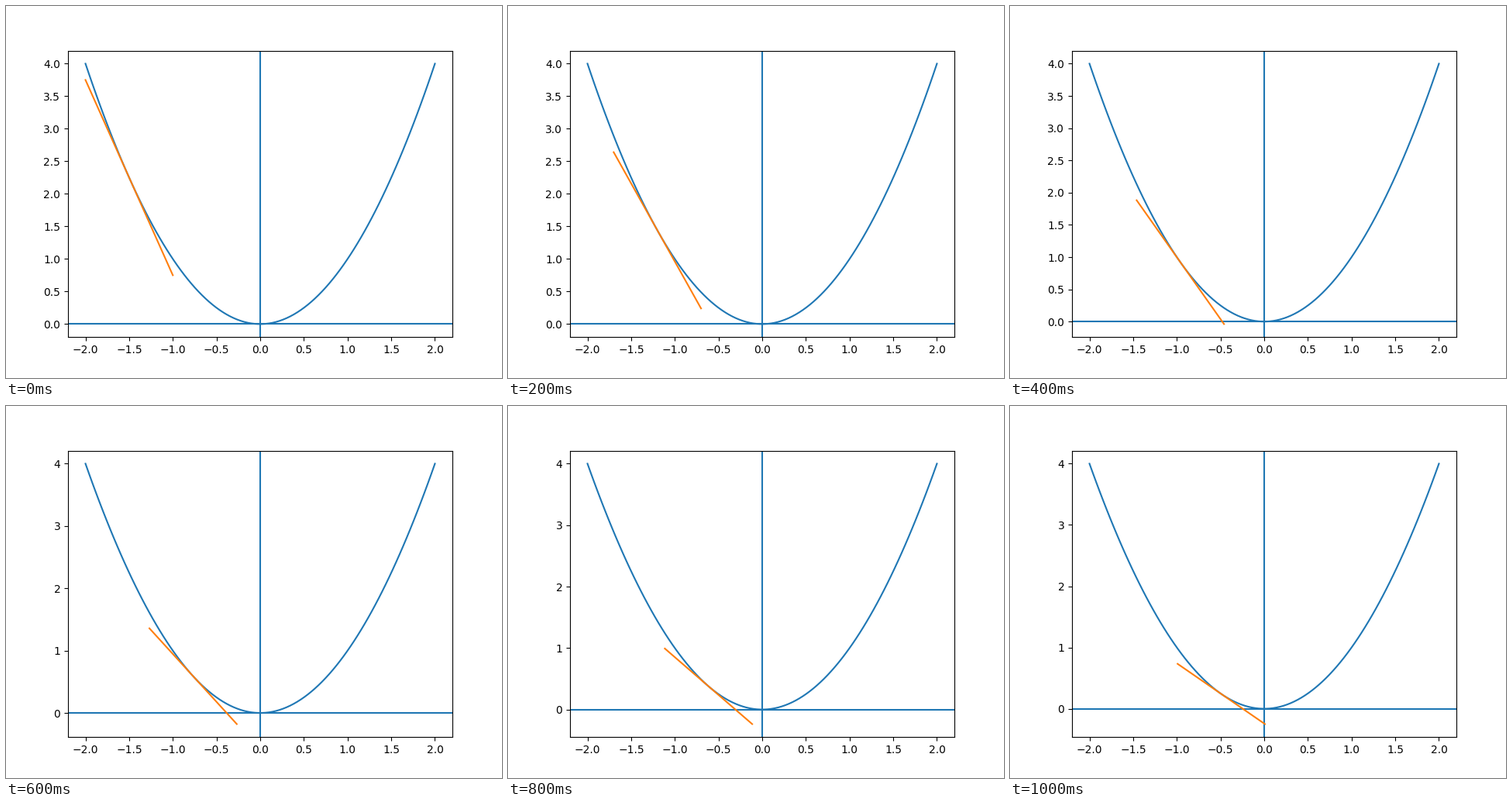
A matplotlib script that plays this animation: 640x480 px, repeating every 1.2 s.

```python
import matplotlib.pyplot as plt
import numpy as np
from matplotlib.animation import FuncAnimation

START = -1.5
RATE = 0.1
STEPS = 6
HALF_WIDTH = 0.5


def f(x):
    return x ** 2


def slope(x):
    return 2 * x


fig, ax = plt.subplots(figsize=(6.4, 4.8), dpi=100)
curve_x = np.linspace(-2, 2, 100)


def draw(step):
    """Show the tangent at the point reached after some descent steps."""
    point = START
    for _ in range(step):
        point -= RATE * slope(point)

    ax.clear()
    ax.axhline(0)
    ax.axvline(0)
    ax.plot(curve_x, f(curve_x), color="C0")
    tangent_x = np.array([point - HALF_WIDTH, point + HALF_WIDTH])
    tangent_y = f(point) + slope(point) * (tangent_x - point)
    ax.plot(tangent_x, tangent_y, color="C1")


animation = FuncAnimation(fig, draw, frames=STEPS, init_func=lambda: None,
                          interval=200, repeat=True, repeat_delay=0)
plt.show()
```
